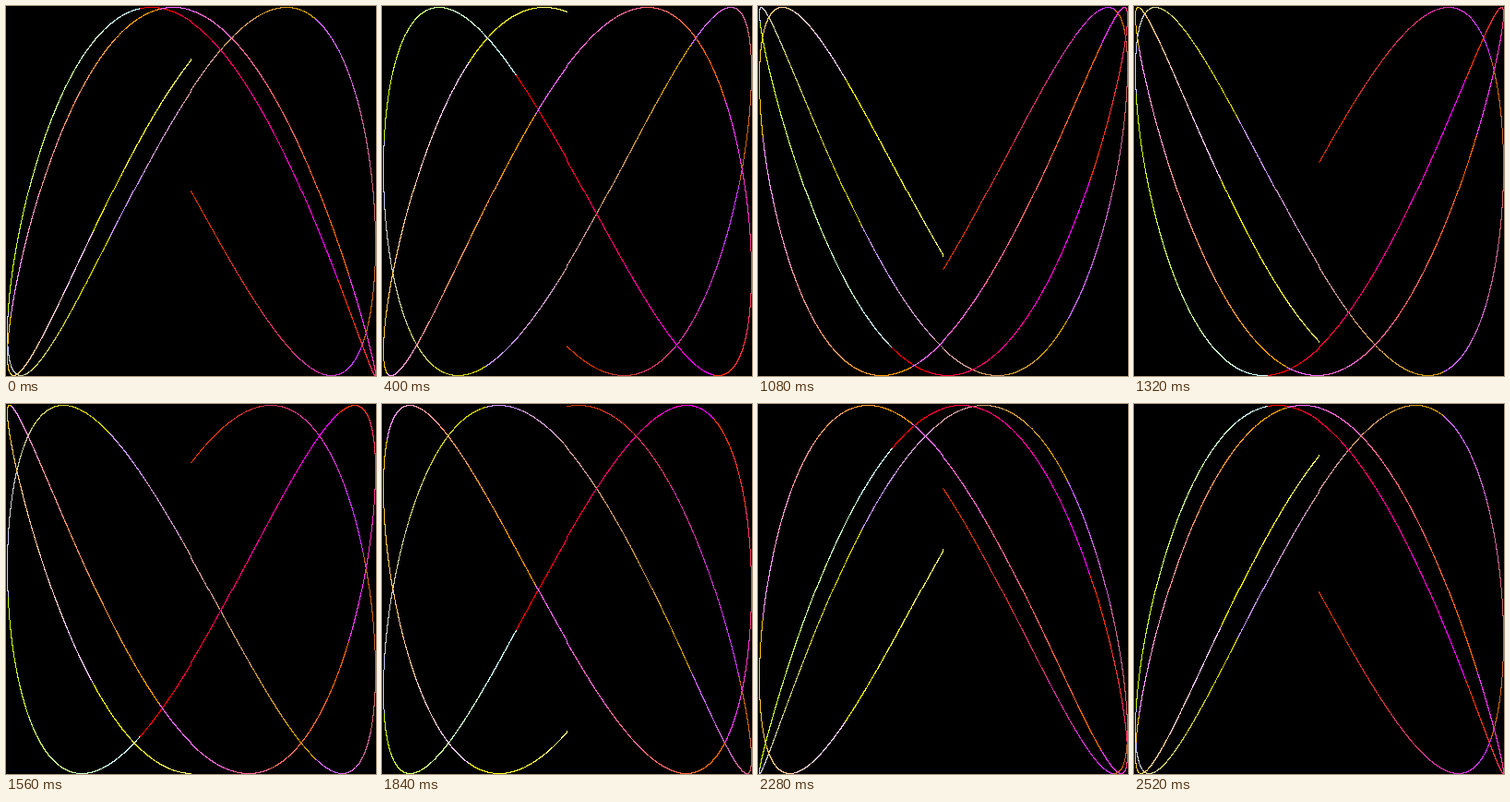
An HTML page with a canvas for the animation above (2560 ms loop, 401 by 401 pixels).

```html
<!DOCTYPE html>
<html lang="en">
<head>
<meta charset="utf-8">
<title>Lissajous</title>
<style>
  html, body { margin: 0; width: 100%; height: 100%; overflow: hidden; background: #000; }
  canvas { display: block; image-rendering: pixelated; }
</style>
</head>
<body>
<canvas width="401" height="401"></canvas>
<script>
const SIZE = 200;            // half the stage, the curve's amplitude
const STEPS = 64;            // poses per loop
const STEP_MS = 40;
const PHASE_STEP = 0.1;
const FREQ = 1.813980863938859;
const END = 4 * Math.PI;     // two swings of the x oscillator
const RES = 0.001;
const FIRST_COLOR = 150;     // index into the 6x6x6 colour cube

const ctx = document.querySelector("canvas").getContext("2d");

// Truncation towards zero leaves a double-width cell at the centre lines.
const toPixel = v => SIZE + Math.trunc(v * SIZE + 0.5);

function cubeColor(index) {
  const level = n => (Math.floor(n) % 6) * 51;
  return `rgb(${level(index / 36)}, ${level(index / 6)}, ${level(index)})`;
}

function draw(phase) {
  ctx.fillStyle = "#000";
  ctx.fillRect(0, 0, 2 * SIZE + 1, 2 * SIZE + 1);
  let band = -1;
  for (let t = 0; t < END; t += RES) {
    const nextBand = Math.floor(t * 5);
    if (nextBand !== band) {
      band = nextBand;
      ctx.fillStyle = cubeColor(FIRST_COLOR + band);
    }
    ctx.fillRect(toPixel(Math.sin(t)), toPixel(Math.sin(t * FREQ + phase)), 1, 1);
  }
}

let shown = -1;
const start = performance.now();

function tick() {
  const step = Math.floor((performance.now() - start) / STEP_MS) % STEPS;
  if (step !== shown) {
    shown = step;
    draw(step * PHASE_STEP);
  }
  requestAnimationFrame(tick);
}
tick();
</script>
</body>
</html>
```
